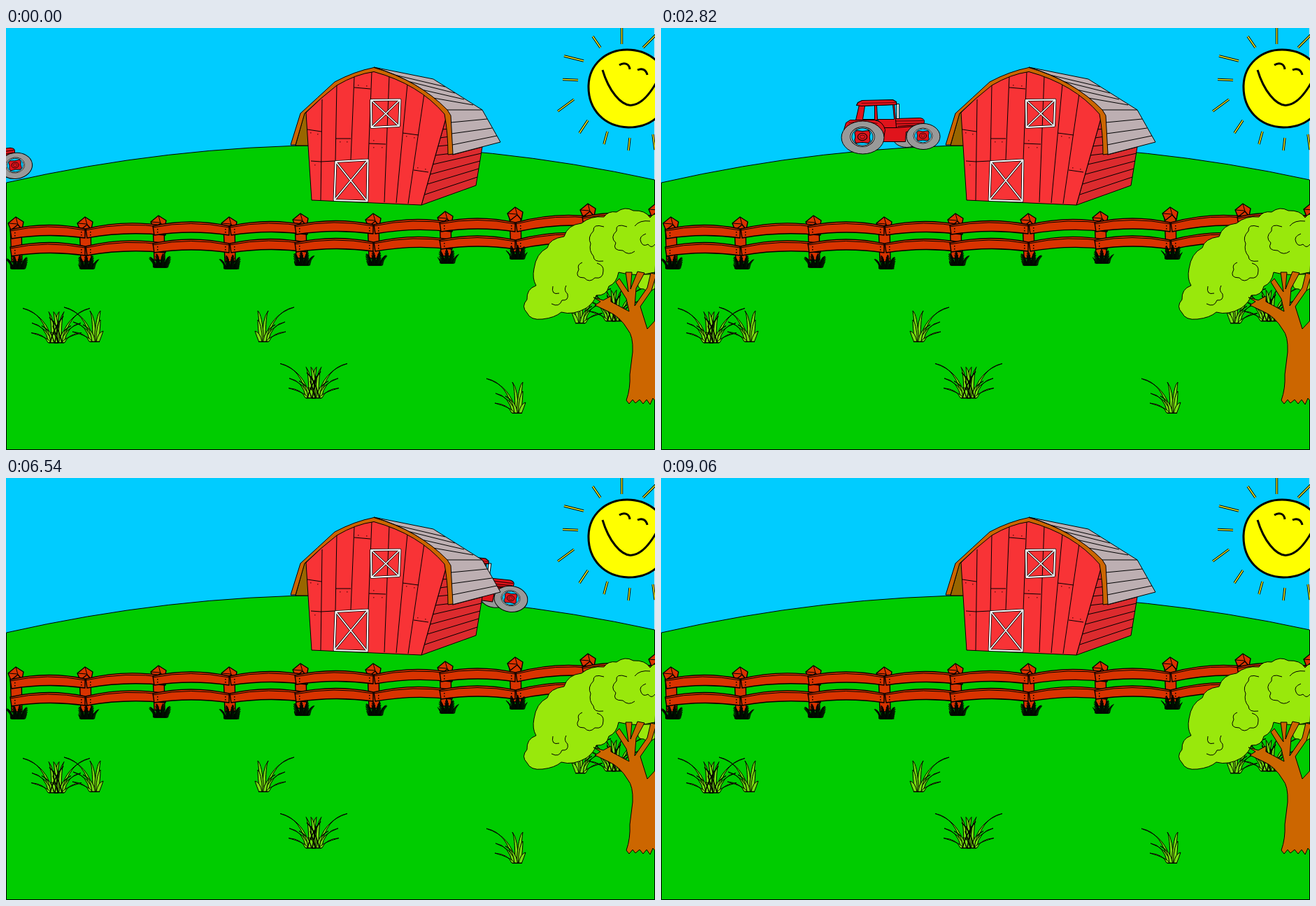
These frames come from a looping animation (928 by 603 pixels, 9.3 s). An HTML page with a canvas:

```html
<!DOCTYPE html>
<html lang="en">
<head>
<meta charset="utf-8">
<title>Farm tractor</title>
<style>
html, body { margin: 0; width: 100%; height: 100%; overflow: hidden; background: #00ccff; }
canvas { display: block; width: 928px; height: 603px; }
</style>
</head>
<body>
<canvas id="stage" width="928" height="603"></canvas>
<script>
const ctx = document.getElementById('stage').getContext('2d');
const SKY = '#00ccff', GREEN = '#00cc00', LEAF = '#99e80c', WOOD = '#cc6600';
const FENCE = '#d93300', RED = '#e0141c', GREY = '#999';
const LOOP = 9300, STEP = 60;

function shape(d, fill, stroke = '#000', width = 1) {
  const p = new Path2D(d);
  if (fill) { ctx.fillStyle = fill; ctx.fill(p, 'evenodd'); }
  if (stroke) { ctx.strokeStyle = stroke; ctx.lineWidth = width; ctx.stroke(p); }
}
const line = (d, color, width) => shape(d, null, color, width);

function oval(x, y, rx, ry, fill, width = 1) {
  ctx.beginPath();
  ctx.ellipse(x, y, rx, ry, 0, 0, 7);
  ctx.fillStyle = fill;
  ctx.fill();
  ctx.strokeStyle = '#000';
  ctx.lineWidth = width;
  ctx.stroke();
}

function land() {
  ctx.fillStyle = SKY;
  ctx.fillRect(0, 0, 928, 603);
  line('M927.5 0V217', '#dde8ee');
  shape('M.5 221Q464 116 927.5 217V602.5H.5Z', GREEN);
}

function sun() {
  const rays = 'M839 12L850 28M880.5 0V23M929 10L911 28M798 40L826 47M796 73.5L818 74.5M789 119L812 102' +
    'M820 150L832 132M855 166L860 148M890 175L892 157M925 152L928 174';
  line(rays, '#000', 3.4);
  line(rays, '#eeee22', 1.5);
  shape('M833 82C834 52 858 31 888 31C920 31 948 54 948 87C948 120 924 142 890 142C856 141 832 117 833 82Z',
    '#ffff00', '#000', 3);
  line('M853 60C862 90 879 110 893 110.5C908 110 920 96 931 76M877 53C883 49 891 50 892 59M903 60C909 57 915 59 917 67',
    '#000', 3);
}

function barn() {
  shape('M427 121L414 168H434L431 121Z', '#996600');
  shape('M631 122L594 253L672 225L681 170L639 181Z', '#dc2b2e');
  line('M599 238L674 213M603 223L676 201M607 209L678 190M610 195L680 179M613 182L638 179' +
    'M617 169L636 167M620 157L635 155M624 145L634 144');
  shape('M429 121Q450 100 472 81Q498 66 526 62Q590 80 631 122L594 253L437 246Z', '#f83336');
  line('M452 102L450 246M473 80L471 190M498 69L493 188M523 62L518 189M548 68L541 249M574 80L558 250M598 94L575 251');
  line('M431 145L451 148M436 190L450 191L470 190M472 158L493 158M498 85L521 87M519 165L543 166M567 150L590 153M583 203L604 206');
  ctx.fillStyle = '#711';
  for (const [x, y] of [[435, 149], [445, 151], [477, 162], [487, 162], [503, 81], [515, 82], [525, 170],
    [537, 170], [572, 154], [583, 156], [588, 199], [599, 201], [441, 195], [525, 160]]) ctx.fillRect(x, y, 1.5, 1.5);

  const frames = [
    ['M522 103L563.5 102.5L562 140L522.5 142Z', 'M522 103L562 140M563.5 102.5L522.5 142'],
    ['M471.5 191L517.5 188.5L516.5 247.5L469.5 246Z', 'M471.5 191L516.5 247.5M517.5 188.5L469.5 246']
  ];
  for (const [edge, cross] of frames) {
    line(cross, '#000', 3);
    line(edge, '#000', 3.6);
    line(cross, '#fff', 1.6);
    line(edge, '#fff', 2);
  }
  shape('M526 56L611 73L681 117L707 163L638 181L635 125L630 117Q590 75 526 56Z', '#bdafb2');
  line('M547 65L628 84M574 76L642 93M594 88L655 102M611 100L668 110M629 117L681 117M636 135L688 130M637 151L695 143M638 167L702 154');
  shape('M407 167L421 122Q445 100 470 77Q498 62 526 56.5Q590 75 631 117L636 125L639 180L632 181' +
    'Q632 150 627 123Q590 80 526 62.5Q500 66 473 82Q450 100 427 122L414 167Z', WOOD);
}

function tuft(x, y) {
  for (let i = 0; i < 34; i++) {
    const r = Math.abs(Math.sin(i * 12.9 + x)), a = (i / 33 - .5) * 2;
    const tx = x + a * (11 + 6 * r), ty = y - 4 - 16 * r * (1 - .4 * a * a);
    const bx = x + a * 9;
    shape(`M${bx - 1.5} ${y}Q${bx + a} ${ty + 3} ${tx} ${ty}Q${bx + a * 2} ${ty + 6} ${bx + 1.5} ${y}Z`, '#002800', '#000', .7);
  }
}

function post(x, y) {
  shape(`M${x - 8} ${y + 12}L${x - 6} ${y + 64}H${x + 9}L${x + 8} ${y + 10}Z`, FENCE, '#000', 1.4);
  shape(`M${x - 11} ${y + 9}L${x} ${y}L${x + 11} ${y + 7}L${x + 9} ${y + 18}L${x + 3} ${y + 11}L${x - 7} ${y + 19}Z`, FENCE, '#000', 1.4);
  line(`M${x} ${y}L${x + 3} ${y + 11}M${x - 11} ${y + 9}L${x + 2} ${y + 10}`);
}

function rail(x0, y0, x1, y1) {
  const mx = (x0 + x1) / 2, my = (y0 + y1) / 2;
  shape(`M${x0} ${y0}Q${mx} ${my - 12} ${x1} ${y1}V${y1 + 13}Q${mx} ${my + 5} ${x0 + 2} ${y0 + 13}Z`, FENCE, '#000', 1.4);
  line(`M${x0} ${y0 + 2}Q${mx} ${my - 9} ${x1} ${y1 + 2}`);
  ctx.fillStyle = '#000';
  for (const x of [x0 + 6, x1 - 6]) for (const d of [4, 8]) ctx.fillRect(x, (x < mx ? y0 : y1) + d, 1.5, 1.5);
}

function fence() {
  const xs = [14, 113, 218, 319, 421, 525, 628, 728, 832, 930];
  const tops = [270, 270, 268, 270, 265, 265, 262, 256, 251, 250];
  const rails = [288, 287, 283, 283, 282, 281, 278, 278, 270, 270];
  xs.forEach((x, i) => post(x, tops[i]));
  for (let i = 0; i < 9; i++) {
    const odd = i % 2, x0 = xs[i] + (odd ? 1 : -8), x1 = xs[i + 1] + (odd ? 10 : 0);
    for (const d of [0, 25]) rail(x0, rails[i] + d, x1, rails[i + 1] + d);
  }
  xs.forEach((x, i) => tuft(x + 3, tops[i] + 74));
}

// A fan of blades: base offset, then tip
const BLADES = [[-3, -43, -49], [-4, -30, -28], [-5, -31, -14], [0, -6, -44], [2, 9, -44], [4, 9, -31], [5, 13, -15], [-1, -16, -24]];
function sprig(x, y, dir) {
  ctx.save();
  ctx.translate(x, y);
  ctx.scale(dir, 1);
  for (const [b, tx, ty] of BLADES) {
    const cx = b + (tx - b) * .22, cy = ty * .88;
    shape(`M${b - 2} 0Q${cx - 1} ${cy} ${tx} ${ty}Q${cx + 4} ${cy + 5} ${b + 2.5} 0Z`, '#77dd11');
  }
  line('M-6 .5H8');
  ctx.restore();
}

function clump(x, y) {
  sprig(x - 5, y, 1);
  sprig(x + 5, y, -1);
  line(`M${x - 9} ${y}Q${x - 4} ${y - 20} ${x + 10} ${y - 38}M${x + 8} ${y}Q${x + 2} ${y - 25} ${x - 10} ${y - 36}` +
    `M${x - 2} ${y}L${x + 3} ${y - 29}M${x + 3} ${y}L${x - 5} ${y - 24}`, '#000', 1.5);
}

function meadow() {
  clump(72, 449.5);
  sprig(126, 448, 1);
  sprig(369, 448, -1);
  clump(440, 528.5);
  sprig(730, 550, 1);
  sprig(822, 421.5, -1);
  clump(869, 418.5);
}

function tree() {
  shape('M904 361Q901 374 912 373Q918 380 928 372V352H905Z', LEAF);
  shape('M932 268Q927 263 921 271Q914 260 897 261Q885 254 873 263Q861 261 855 270Q836 268 823 279Q803 281 798 298' +
    'Q777 301 774 314Q758 322 755 344Q752 358 758 368Q744 373 745 388Q736 398 745 407Q750 418 767 416' +
    'Q785 414 794 406Q811 411 830 400Q841 392 844 382Q859 383 862 369Q873 365 876 349Q900 356 928 349Z', LEAF);
  line('M855 284Q839 279 840 290Q831 299 836 308Q833 318 840 326Q840 335 854 333' +
    'M888 284Q871 278 873 290Q863 299 872 307Q866 318 882 318Q890 326 899 319' +
    'M824 335Q816 338 819 345Q812 357 827 357Q834 365 842 357Q854 359 854 347Q855 339 845 336' +
    'M782 369Q779 382 791 379M801 368Q797 375 803 380Q805 390 795 389Q791 400 780 394' +
    'M915 294Q904 298 908 306Q911 313 918 309Q923 316 928 309M899 283Q906 274 921 276');
  shape('M930 352L923 375L907 398L917 430L930 416V535L925 529L921 538L916 531L911 537L906 531L900 536L896 531L891 537' +
    'L887 532Q893 515 892 495L896 463Q897 440 889 431Q878 412 861 405L842 396L850 391L840 385L854 389L865 383' +
    'L865 391L891 405L887 387L872 363L877 358L890 377L886 349H895L893 373L903 348L913 350L901 372L899 397' +
    'L917 371L922 350Z', WOOD);
}

function wheel(x, y, rx, ry) {
  oval(x, y, rx, ry, GREY);
  ctx.save();
  ctx.translate(x - .5, y - 1);
  ctx.scale(rx / 30, ry / 23.5);
  oval(0, 0, 17, 14, '#fff');
  oval(0, 0, 15, 12.5, SKY);
  shape('M-11 -6L-8 -9L0 -8L9 -9L11 -5L10 0L11 6L8 9L0 8L-9 9L-11 5L-10 0Z', RED);
  oval(0, 0, 6.5, 5.2, RED);
  oval(0, 0, 3.5, 2.6, RED, .6);
  ctx.restore();
}

// Local origin is the centre of the rear wheel
function tractor(x, y, deg) {
  ctx.save();
  ctx.translate(x, y);
  ctx.rotate(deg * Math.PI / 180);
  oval(63, 0, 20, 14, GREY);
  shape('M22 -23L46 -24L86 -20L84 -10L62 -8L61 6H26Z', RED);
  shape('M46 -27L82 -28Q88 -27 88 -23L87 -17L47 -14Z', RED);
  line('M46 -23.5L87 -24M47 -19.5L86 -20.5M50 -16Q70 -18 86 -17', '#400', 1.2);
  shape('M48.5 -48H52V-27H48.5Z', '#e8eef0');
  shape('M-5 -47L45 -48L47 -26L48 -14H28L22 -25H-10Z' +
    'M3 -45L0 -26H17V-46ZM20 -46L21 -26H45L43 -47Z', RED);
  shape('M-9 -46L-7 -50L-1 -53L43 -54L48 -51L48 -47L-2 -45Z', RED, '#000', 1.2);
  line('M-2 -49L47 -50', '#600');
  shape('M-27 -11L-24 -21L-18 -25H17Q29 -23 32 -11L30 0Q20 -20 0 -20Q-17 -20 -27 -11Z', RED);
  line('M-20 -21Q0 -25 21 -20', '#600');
  wheel(0, 0, 30.5, 23.5);
  wheel(86.5, -1.5, 24, 18.5);
  ctx.restore();
}

// time, x, y, tilt
const ROUTE = [
  [0, -72, 209, -7], [960, 75.5, 184, -4.3], [1140, 104, 178.5, -3.4], [1680, 187, 165, -2],
  [2820, 288.5, 156.5, 0], [3840, 376, 151.5, 1], [5820, 547, 154, 5], [6540, 636, 163, 7.5],
  [7680, 780, 174.5, 11.2], [9060, 963, 203, 13]
];
function pose(t) {
  const i = ROUTE.findIndex(k => k[0] > t), a = ROUTE[i - 1], b = ROUTE[i];
  const f = (t - a[0]) / (b[0] - a[0]);
  return [1, 2, 3].map(n => a[n] + (b[n] - a[n]) * f);
}

function draw(t) {
  land();
  sun();
  if (t < 9060) tractor(...pose(t));
  barn();
  fence();
  meadow();
  tree();
}

ctx.lineJoin = 'round';
const start = performance.now();
let shown = -1;
function tick() {
  const t = Math.floor((performance.now() - start) % LOOP / STEP) * STEP;
  if (t !== shown) draw(shown = t);
  requestAnimationFrame(tick);
}
tick();
</script>
</body>
</html>
```
